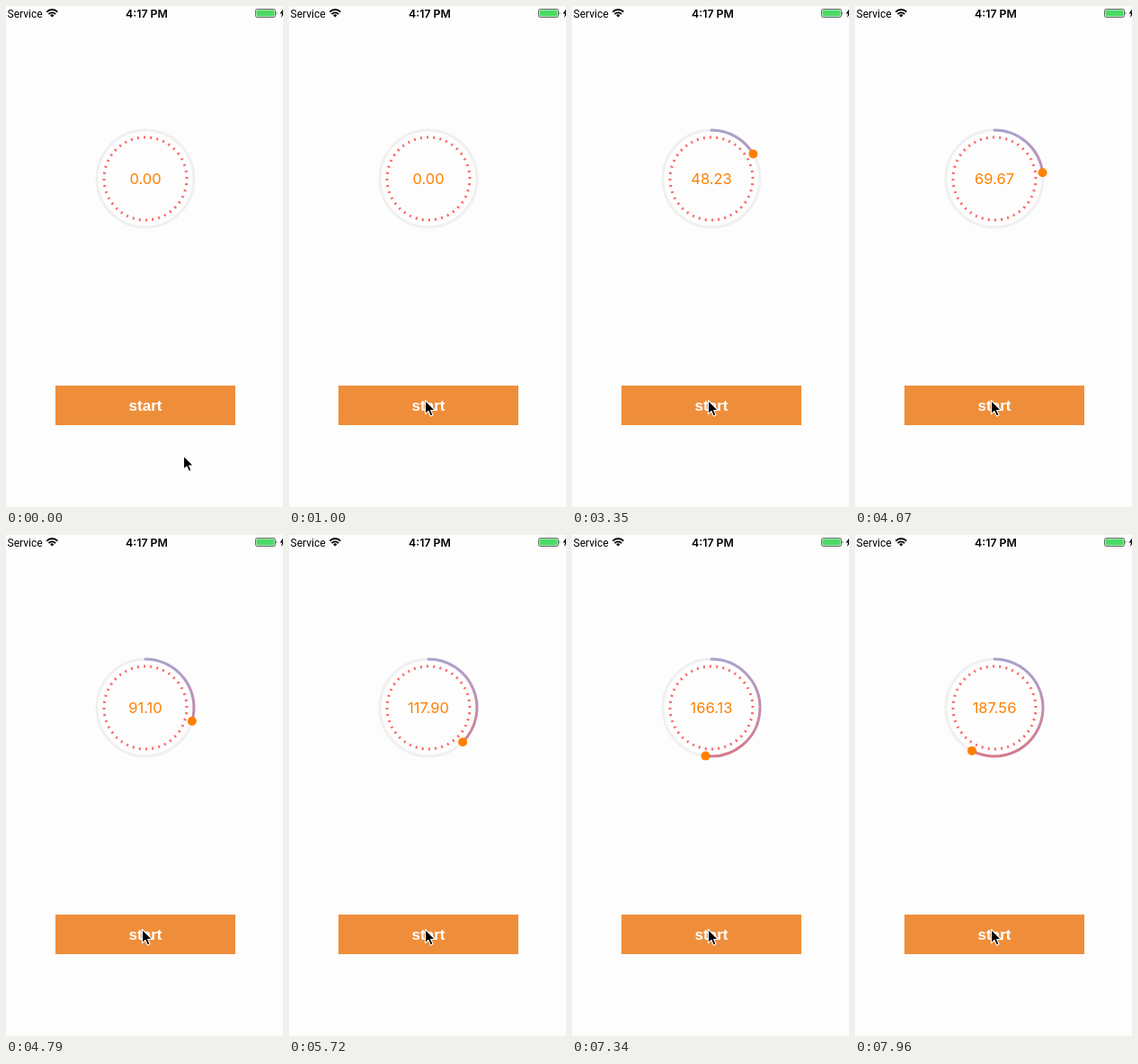
Animation of 308 by 557 pixels, one loop 7.99 s. Source, as an HTML page:

```html
<!DOCTYPE html>
<html lang="en">
<head>
<meta charset="utf-8">
<title>Circular progress</title>
<style>
  html, body { margin: 0; width: 100%; height: 100%; overflow: hidden; background: #fdfdfd; }
  svg { display: block; width: 308px; height: 557px; }
  text { font-family: Inter, Roboto, sans-serif; }
</style>
</head>
<body>
<svg viewBox="0 0 308 557">
  <defs>
    <linearGradient id="fade" gradientUnits="userSpaceOnUse" x1="0" y1="138" x2="0" y2="246">
      <stop offset="0" stop-color="#aca2cd"/>
      <stop offset="1" stop-color="#d67b8c"/>
    </linearGradient>
  </defs>

  <!-- status bar -->
  <text x="1.5" y="12.5" font-size="12" style="font-family: Roboto, sans-serif">Service</text>
  <g fill="none" stroke="#000" stroke-width="1.9">
    <path d="M45.3 6.6A8.3 8.3 0 0 1 57.3 6.6"/>
    <path d="M47.5 9A5.3 5.3 0 0 1 55.1 9"/>
  </g>
  <path d="M49.2 10.4A3 3 0 0 1 53.4 10.4L51.3 12.6Z"/>
  <text x="156.5" y="12.5" font-size="12.3" font-weight="600" text-anchor="middle">4:17 PM</text>
  <rect x="277.5" y="3.5" width="22" height="9" rx="1.8" fill="none" stroke="#555" stroke-width=".9"/>
  <rect x="278.5" y="4.5" width="20" height="7" rx="1" fill="#4cd964"/>
  <path d="M300.6 6.3Q302.4 8 300.6 9.8Z" fill="#333"/>
  <path d="M308.5 3L304.5 8.6H307L306 13L310 7.4H307.6Z"/>

  <!-- dial -->
  <circle cx="155" cy="192" r="54" fill="none" stroke="#f0f0f0" stroke-width="3"/>
  <circle cx="155" cy="192" r="46" fill="none" stroke="#fa6a6a" stroke-width="3"
          pathLength="280" stroke-dasharray="2 5" transform="rotate(-92.5 155 192)"/>
  <g id="progress">
    <path id="arc" fill="none" stroke="url(#fade)" stroke-width="3" stroke-linecap="round"/>
    <circle id="knob" r="5" fill="#ff8000"/>
  </g>
  <text id="counter" x="155" y="198" font-size="16.5" fill="#ff8000" text-anchor="middle"></text>

  <!-- button -->
  <rect x="55" y="422" width="200" height="44" fill="#ef8e3a"/>
  <text id="label" x="155" y="450" font-size="17" font-weight="700" fill="#fff" text-anchor="middle"
        style="font-family: 'Liberation Sans', sans-serif">start</text>

  <path id="cursor" d="M0 0V15.2L3.5 12L5.9 17.4L8.6 16.2L6.2 11H11Z"
        stroke="#fff" stroke-width="1.1" stroke-linejoin="round"/>
</svg>
<script>
  const LOOP = 7990, MOVE_START = 230, MOVE_END = 1000, PRESS = 1560;
  const TICK = 181, TICK_VALUE = 5.3589;
  const CENTER = { x: 155, y: 192 }, RADIUS = 54;
  // [time in ms, swept degrees]
  const SWEEP = [[PRESS, 0], [2270, 23.5], [3350, 59.4], [4790, 106], [6680, 165], [7960, 207.5], [LOOP, 208.5]];

  const el = id => document.getElementById(id);
  const [progress, arc, knob, counter, label, cursor] =
    ['progress', 'arc', 'knob', 'counter', 'label', 'cursor'].map(el);
  const clamp = v => Math.min(1, Math.max(0, v));
  const bezier = (a, b, c, d, u) =>
    a * (1 - u) ** 3 + 3 * b * u * (1 - u) ** 2 + 3 * c * u * u * (1 - u) + d * u ** 3;

  function sweepAt(t) {
    const i = Math.max(1, SWEEP.findIndex(([time]) => time >= t));
    const [t0, a0] = SWEEP[i - 1], [t1, a1] = SWEEP[i];
    return a0 + (a1 - a0) * clamp((t - t0) / (t1 - t0));
  }

  function drawCursor(t) {
    const p = clamp((t - MOVE_START) / (MOVE_END - MOVE_START));
    const u = p * p * (3 - 2 * p);
    const x = bezier(197.5, 215, 180, 151.5, u);
    const y = bezier(500, 350, 330, 438.5, u);
    cursor.setAttribute('transform', `translate(${x} ${y})`);
  }

  function drawProgress(t) {
    const running = t >= PRESS;
    progress.style.display = running ? '' : 'none';
    const ticks = running ? Math.floor((t - PRESS) / TICK) : 0;
    counter.textContent = (ticks * TICK_VALUE).toFixed(2);
    label.setAttribute('opacity', running ? 0.4 + 0.6 * clamp((t - PRESS) / 350) : 1);

    const degrees = sweepAt(t), angle = degrees * Math.PI / 180;
    const x = CENTER.x + RADIUS * Math.sin(angle);
    const y = CENTER.y - RADIUS * Math.cos(angle);
    const large = degrees > 180 ? 1 : 0;
    arc.setAttribute('d', `M${CENTER.x} ${CENTER.y - RADIUS}A${RADIUS} ${RADIUS} 0 ${large} 1 ${x} ${y}`);
    knob.setAttribute('cx', x);
    knob.setAttribute('cy', y);
  }

  const start = performance.now();
  function frame() {
    const t = (performance.now() - start) % LOOP;
    drawCursor(t);
    drawProgress(t);
    requestAnimationFrame(frame);
  }
  frame();
</script>
</body>
</html>
```
